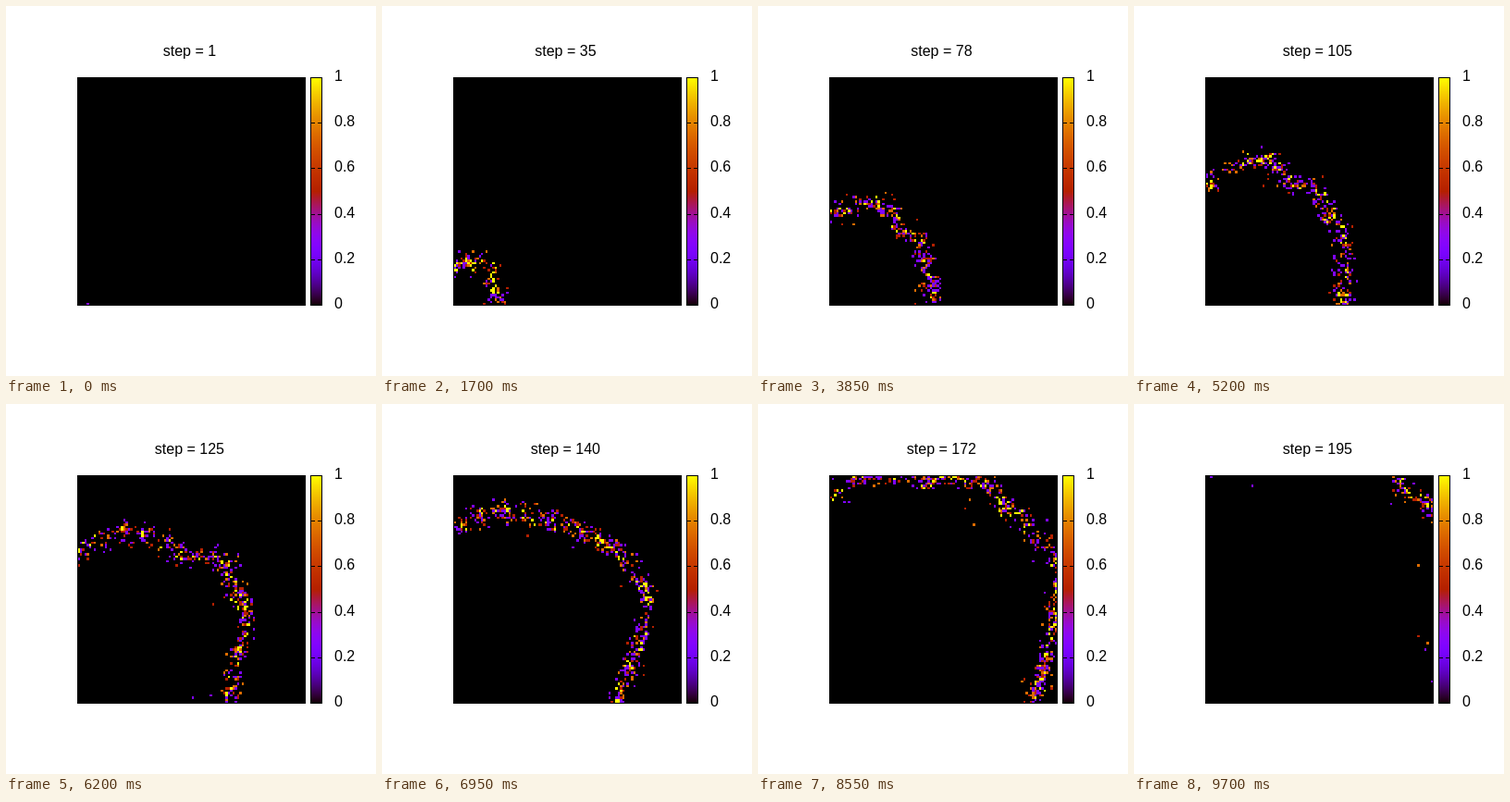
An HTML page with a canvas that plays this animation: 400 by 400 pixels, repeating every 9750 ms.

```html
<!DOCTYPE html>
<html lang="en">
<head>
<meta charset="utf-8">
<title>Spreading front</title>
<style>
  html, body { margin: 0; width: 100%; height: 100%; overflow: hidden; background: #fff; }
  canvas, svg { position: absolute; left: 0; top: 0; width: 400px; height: 400px; }
  text { font: 16px "Liberation Sans", Arial, sans-serif; fill: #000; }
</style>
</head>
<body>
<canvas id="stage" width="400" height="400"></canvas>
<svg id="labels" viewBox="0 0 400 400"></svg>
<script>
const STEPS = 195, STEP_MS = 50;
const CELLS = 100, LEFT = 77.5, BOTTOM = 323.5, SIZE = 246;
const PITCH = SIZE / CELLS;
const ANGLE_GAP = 6;

// Front radius from the lower left corner, every 6 degrees from 0 to 90.
const FRONTS = [
  { step: 1, radii: Array(16).fill(8) },
  { step: 35, radii: [43, 45, 46, 46, 46, 48, 52, 56, 58, 54, 52, 53, 52, 47, 42, 38] },
  { step: 78, radii: [107, 110, 112, 114, 117, 113, 124, 117, 111, 121, 125, 122, 116, 107, 100, 98] },
  { step: 105, radii: [150, 150, 154, 157, 161, 168, 163, 172, 173, 159, 166, 170, 164, 155, 138, 131] },
  { step: 125, radii: [163, 165, 172, 182, 198, 210, 211, 220, 214, 198, 195, 197, 193, 189, 175, 162] },
  { step: 154, radii: [190, 203, 215, 238, 244, 271, 263, 264, 256, 261, 257, 239, 238, 230, 223, 208] },
  { step: 195, radii: [258, 262, 268, 280, 295, 305, 322, 322, 316, 325, 310, 292, 285, 275, 268, 253] }
];

const ctx = document.getElementById("stage").getContext("2d");
const labels = document.getElementById("labels");
const mix = (a, b, k) => a + (b - a) * k;

function palette(v) {
  const rgb = [Math.sqrt(v), v ** 3, Math.max(0, Math.sin(2 * Math.PI * v))];
  return `rgb(${rgb.map(c => Math.round(255 * c)).join(",")})`;
}

function random(x, y, z) {
  let h = Math.imul(x + 11, 374761393) ^ Math.imul(y + 7, 668265263) ^ Math.imul(z + 3, 1274126177);
  h = Math.imul(h ^ (h >>> 15), 2246822519);
  h = Math.imul(h ^ (h >>> 13), 3266489917);
  return ((h ^ (h >>> 16)) >>> 0) / 4294967296;
}

function smoothNoise(x, y, seed) {
  const i = Math.floor(x), j = Math.floor(y);
  const ease = k => k * k * (3 - 2 * k);
  const u = ease(x - i), v = ease(y - j);
  const row = n => mix(random(i, n, seed), random(i + 1, n, seed), u);
  return mix(row(j), row(j + 1), v);
}

const cells = [];
for (let row = 0; row < CELLS; row++) {
  for (let col = 0; col < CELLS; col++) {
    const x = (col + 0.5) * PITCH, y = (row + 0.5) * PITCH;
    cells.push({
      col, row,
      radius: Math.hypot(x, y),
      angle: Math.atan2(y, x) * 180 / Math.PI / ANGLE_GAP,
      cluster: smoothNoise(col / 4, row / 4, 500),
      phase: Math.floor(random(col, row, 900) * 3)
    });
  }
}

function frontAt(step) {
  let n = 0;
  while (n < FRONTS.length - 2 && step > FRONTS[n + 1].step) n++;
  const a = FRONTS[n], b = FRONTS[n + 1];
  const k = (step - a.step) / (b.step - a.step);
  return a.radii.map((r, i) => mix(r, b.radii[i], k));
}

function cellValue(cell, front, width, step) {
  const i = Math.min(14, Math.floor(cell.angle));
  const ahead = cell.radius - mix(front[i], front[i + 1], cell.angle - i);
  if (ahead > 20 || ahead < -45) return 0;
  const age = Math.floor((step + cell.phase) / 3);
  const chance = random(cell.col, cell.row, age);
  const crowd = Math.exp(-((ahead / width) ** 2)) * Math.min(1, 0.12 + 1.1 * cell.cluster);
  const stray = ahead < 0 ? 0.002 : 0;
  if (chance > crowd * 0.72 + stray) return 0;
  const level = random(cell.col, cell.row, age + 2000) ** 1.5 * (0.6 + 0.75 * crowd);
  return Math.min(4, 1 + Math.floor(4 * level)) / 4;
}

function fillCell(col, row, value) {
  const x0 = Math.round(LEFT + col * PITCH), x1 = Math.round(LEFT + (col + 1) * PITCH);
  const y0 = Math.round(BOTTOM - (row + 1) * PITCH), y1 = Math.round(BOTTOM - row * PITCH);
  ctx.fillStyle = palette(value);
  ctx.fillRect(x0, y0, x1 - x0, y1 - y0);
}

function drawField(step) {
  ctx.fillStyle = "#000";
  ctx.fillRect(77, 77, 247, 247);
  if (step === 1) {
    fillCell(4, 0, 0.3);
  } else {
    const front = frontAt(step);
    const width = Math.min(9, 3 + step * 0.17);
    for (const cell of cells) {
      const value = cellValue(cell, front, width, step);
      if (value) fillCell(cell.col, cell.row, value);
    }
  }
  ctx.strokeStyle = "#000";
  ctx.strokeRect(77.5, 77.5, 246, 246);
}

function drawColorBar() {
  for (let y = 78; y < 323; y++) {
    ctx.fillStyle = palette((323 - y) / 246);
    ctx.fillRect(329, y, 13, 1);
  }
  ctx.strokeStyle = "#000";
  ctx.strokeRect(329.5, 77.5, 12, 246);
  ctx.fillStyle = "#000";
  for (let n = 1; n < 5; n++) {
    const y = Math.round(323 - n * 49.2);
    ctx.fillRect(329, y, 5, 1);
    ctx.fillRect(337, y, 5, 1);
  }
}

function addText(x, y, content, anchor = "start") {
  const node = document.createElementNS("http://www.w3.org/2000/svg", "text");
  node.setAttribute("x", x);
  node.setAttribute("y", y);
  node.setAttribute("text-anchor", anchor);
  node.textContent = content;
  labels.append(node);
  return node;
}

ctx.fillStyle = "#fff";
ctx.fillRect(0, 0, 400, 400);
drawColorBar();
for (let n = 0; n <= 5; n++) addText(355, Math.round(327 - n * 49.2), String(n / 5));
const title = addText(198.4, 54, "", "middle");

let shown = 0;
function show(time) {
  const step = 1 + Math.floor(time / STEP_MS) % STEPS;
  if (step !== shown) {
    shown = step;
    title.textContent = "step = " + step;
    drawField(step);
  }
}

const start = performance.now();
function tick() {
  show(performance.now() - start);
  requestAnimationFrame(tick);
}
tick();
</script>
</body>
</html>
```
